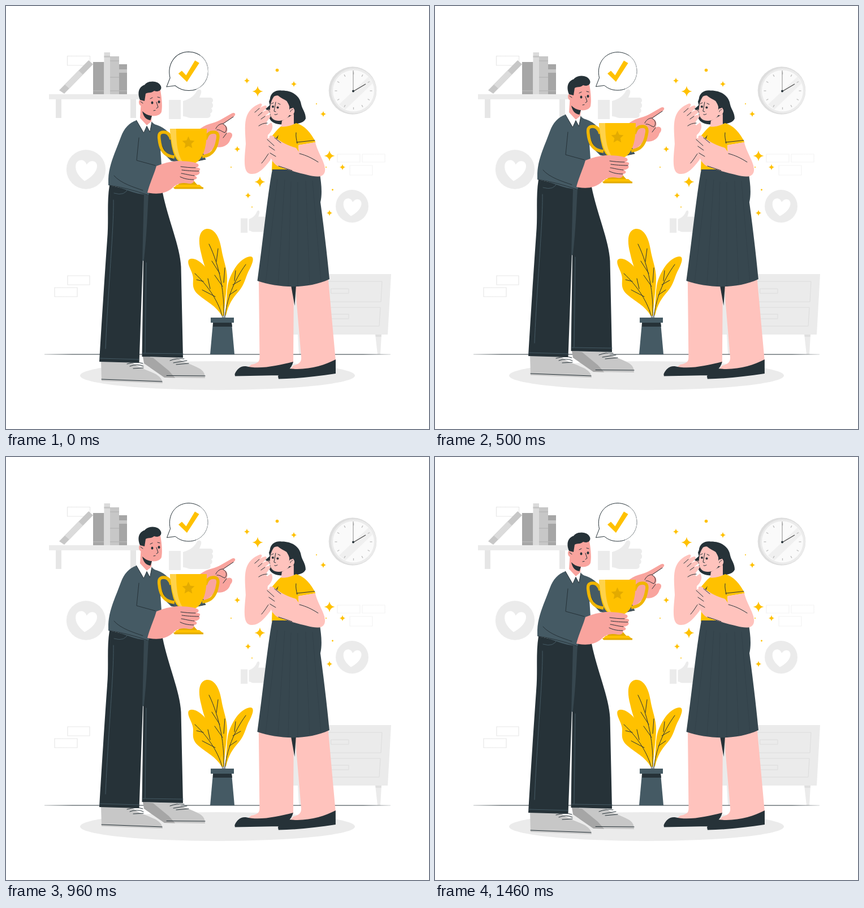
Animation of 748 by 748 pixels, one loop 1500 ms. Source, as an HTML page:

```html
<!DOCTYPE html>
<html lang="en">
<head>
<meta charset="utf-8">
<title>Award</title>
<style>
  html, body { margin: 0; width: 100%; height: 100%; overflow: hidden; background: #fff; }
  svg { display: block; width: 100vw; height: 100vh; }
  .pale { fill: #ebebeb; }
  .white { fill: #fff; }
  .mid { fill: #c7c7c7; }
  .grey { fill: #a6a6a6; }
  .light { fill: #dbdbdb; }
  .ink { fill: #263238; }
  .slate { fill: #37474f; }
  .wool { fill: #455a64; }
  .gold { fill: #ffc100; }
  .amber { fill: #e3ab00; }
  .skin { fill: #ffc3bd; }
  .tan { fill: #f9a49e; }
  .line, .seam, .edge { fill: none; stroke: #263238; stroke-width: 1; stroke-linecap: round; stroke-linejoin: round; }
  .seam { stroke: #455a64; }
  .edge { stroke: #dcdcdc; }
</style>
</head>
<body>
<svg viewBox="0 0 748 748">
  <defs>
    <linearGradient id="fade"><stop stop-color="#e6e6e6"/><stop offset="1" stop-color="#f4f4f4"/></linearGradient>
    <linearGradient id="floor" gradientUnits="userSpaceOnUse" x1="68" x2="680">
      <stop stop-color="#263238" stop-opacity=".3"/><stop offset=".08" stop-color="#263238"/>
      <stop offset=".92" stop-color="#263238"/><stop offset="1" stop-color="#263238" stop-opacity=".2"/>
    </linearGradient>
    <path id="heart" d="M0 21C-11 15-21 6-21-6C-21-17-7-22-1-10C5-23 20-20 19-7C18 5 9 14 0 21Z"/>
    <path id="thumb" d="M0 18H21V52H0ZM25 20C36 17 44 12 49 3C52-3 59-1 57 6L54 14H74C79 15 79 21 76 23C79 26 79 31 75 33C78 36 77 41 73 42C75 46 73 50 68 50H38C34 50 31 47 25 47Z"/>
  </defs>

  <path d="M108.500 88.500H148.500V105H108.500ZM586 262H626V276H586ZM630 262H670V276H630ZM608 282H648V299H608ZM109 477H148V493H109ZM86 498H126V514H86Z" fill="none" stroke="url(#fade)" stroke-width="1.200"/>

  <!-- shelf and books -->
  <path fill="#e6e6e6" d="M88 164H98V198H88ZM220 164H230V198H220Z"/>
  <path class="pale" d="M76 156H242V165H76Z"/>
  <path class="mid" d="M94 149L146 96L154 103L103 155Z"/>
  <path class="light" d="M104 139L128 114L136 121L112 146Z"/>
  <path class="grey" d="M154 99H173.500V156H154ZM200 103H214V156H200Z"/>
  <path class="light" d="M173.500 82H184V156H173.500Z"/>
  <path class="mid" d="M184 89H200V156H184ZM173.500 88H184V91H173.500ZM200 112H214V118H200Z"/>
  <path d="M154 150H173M184 97H200M184 150H214M184 126H200" stroke="#b8b8b8" stroke-width="1.500"/>

  <!-- clock -->
  <circle cx="613" cy="149.500" r="42.300" fill="#dedede"/>
  <circle cx="615" cy="150" r="40" class="pale"/>
  <circle cx="614.500" cy="150" r="36.500" fill="#fafafa"/>
  <path fill="#f0f0f0" d="M589 174L641 125L648 137L600 183Z"/>
  <g id="ticks" stroke="#bdbdbd" stroke-width="1.300"></g>
  <path d="M614 114V150" stroke="#8a8a8a"/>
  <path d="M614 151L636 138" stroke="#4a4a4a" stroke-width="1.200"/>
  <circle cx="614" cy="150.500" r="2" class="ink"/>

  <use href="#thumb" x="288" y="148" class="pale"/>
  <use href="#thumb" class="pale" transform="translate(415 362) scale(.58 .75)"/>
  <circle cx="141.500" cy="289" r="34.700" class="pale"/>
  <use href="#heart" class="white" transform="translate(142 290) rotate(9) scale(.94)"/>
  <circle cx="612" cy="354" r="29" class="pale"/>
  <use href="#heart" class="white" transform="translate(612.500 355) rotate(9) scale(.79)"/>

  <!-- cabinet -->
  <path class="pale" d="M500 474H681L675 581H498ZM516 581H524L522 616H518ZM653 581H664L662 616H657Z"/>
  <path fill="#dfdfdf" d="M653 581H664L663.500 585H654Z"/>
  <path class="edge" d="M520 487H665L663 523H520ZM520 533H662L660 566H520ZM575 500H606V508H575ZM575 545H606V553H575Z"/>

  <path d="M68 616L680 616.100" stroke="url(#floor)"/>
  <ellipse cx="374" cy="653.500" rx="243" ry="25.500" class="pale"/>

  <!-- plant -->
  <g class="gold">
    <path d="M383 548C382 527 379 512 371 499C358 480 350 460 345 437C339 414 341 396 355 394C370 393 378 411 381 430C384 449 391 464 391 481C391 500 387 520 385 548Z"/>
    <path d="M381 547C371 530 355 523 342 512C328 501 331 492 331 482C331 470 319 457 323 449C330 442 348 453 356 467C361 479 372 489 377 502C382 518 381 535 383 548Z"/>
    <path d="M387 547C391 525 389 508 393 490C399 469 413 446 431 443C440 442 437 453 431 465C424 477 423 489 415 500C407 511 395 520 389 547Z"/>
  </g>
  <path class="line" d="M385 551C387 510 378 460 359 421M372 452L375 429M378 473L364 451M383 496L369 476M385 489L387 463M383 551C377 525 359 496 334 473M361 500L357 482M349 487L337 484M370 514L347 502M387 551C390 520 402 487 424 457M404 486L406 468M401 493L415 485M395 511L408 502"/>
  <path class="wool" d="M366 560H399L404 616H361Z"/>
  <path class="ink" d="M366 560H399L400 567H366Z"/>
  <path class="wool" d="M362 551H403V560H362Z"/>

  <g id="sparkles" class="gold"></g>

  <g id="bubble">
    <path d="M284.500 142.500L290.500 127C285 103 299 82 323 81.500C343 82 357 96 357 115.500C357 134 343 149 323 149C313 149 306 146 299.500 140.500Z" fill="#fff" stroke="#263238"/>
    <path d="M336 147C350 141 358 130 357 112C356 101 350 93 343 88" fill="none" stroke="#fff" opacity=".75"/>
    <path class="gold" d="M305 119.500L311 114.500L318.500 122.500L334 96.500L341.500 101L320 134Z"/>
  </g>

  <g id="woman">
    <path class="skin" d="M447 486L509 490L508 631L480 645L424 642L434 634C446 632 448.500 628 448.500 621ZM511 490L570 484L583 628L545 643L500 645L508 636C519 633 523 629 522 620Z"/>
    <path class="ink" d="M504 494H513L510.500 530Z"/>
    <path class="ink" d="M404.500 651C408 642 415 636 424 637C449 643 480 636 508 629C505 642 494 649 483 653L405 654.500ZM481 655C485 645 491 641 500 641C531 645 562 636 583 625V650C548 655 516 659 482 659.500Z"/>

    <!-- head -->
    <path class="ink" d="M468 174C463 157 474 148 487 149.500C506 149 520 159 522 174C524 183 530 188 530 199C527 208 510 210 498 208C485 212 470 208 466 199L467 189L459 182Z"/>
    <path class="skin" d="M488 203L509 191V207C510 215 501 220 486 217Z"/>
    <path class="skin" d="M469 163C476 157 484 157 491 162C497 167 500 174 502 180C507 176 512 183 509 190C506 195 503 193 501 193C497 201 486 205 476 202C468 199 466 191 467 181Z"/>
    <path class="ink" d="M470 157L478 155C484 163 494 165 499 170C502 175 501 181 501 186L507 180L510 163L486 151ZM479 154C474 159 469 166 467 177L465 169L470 157Z"/>
    <circle cx="505.500" cy="185.500" r="4.800" class="skin"/>
    <path class="line" d="M477 170L474 186L477 187M469 173L473 171M481 172L485 174M475 192Q478 193 480 191M503 187Q504 183 507 183"/>
    <circle cx="472" cy="178" r="2" class="ink"/>
    <circle cx="480.500" cy="179.500" r="2" class="ink"/>

    <path class="gold" d="M486 213C494 215 506 211 513 207C528 211 540 225 547.500 241L517 246L520 291H470L472 245L468 233C474 225 480 218 486 213Z"/>
    <path class="line" d="M513 224C512 231 514 237 515 243M514 241L546 237.500" stroke-width=".8"/>

    <!-- raised arm -->
    <path class="skin" d="M469 206C474 213 470 222 463 228L462 242L472 254L468 272C459 283 449 297 435 297C419 297 421 276 424 244C423 224 421 207 426 194C430 184 438 177 448 173C454 171 454 176 448 181C454 177 460 174 461 178C462 181 456 184 453 188C461 182 468 182 467 186C466 190 461 191 458 195C465 191 470 192 467 197C463 202 458 207 462 211Z"/>
    <path class="line" d="M448 181L440 188M453 188L446 194M458 195L451 200M462 207C456 207 451 209 447 212M468 258C463 260 461 268 452 278M460 181L466 186"/>

    <path class="slate" d="M471 289C462 336 454 420 444.500 486C482 499 534 501 572 483C568 440 561 383 556 347C560 330 557 311 555 297L523 289Z"/>
    <path d="M480 306L459 490M493 307L481 493M504 310L499 495M516 311V495M530 309L537 492M542 309L557 487" fill="none" stroke="#314048" stroke-width=".7"/>

    <!-- hand on chest -->
    <path class="ink" d="M472.500 241L482 228L477 242Z"/>
    <path class="skin" d="M517 246L547 241C552 262 566 278 564 292C562 305 546 302 534 299C512 294 493 288 480 283C470 276 469 269 465 262C461 255 463 250 460 243C458 236 461 232 466 234C464 229 470 227 475 232L487 240C495 245 504 248 513 251L518 258Z"/>
    <path class="line" d="M462 236L474 247M465 248L475 255M467 260L477 266M475 233L486 242M519 261C531 264 541 269 552 276M482 283L506 291"/>
  </g>

  <g id="man">
    <!-- shoes -->
    <path class="mid" d="M242 620L303 622C312 630 328 633 342 641C349 645 352 650 352 658L291 657Z"/>
    <path class="grey" d="M242 620L260 622L288 645L299 657.500L280 657L244 632Z"/>
    <path class="mid" d="M168 627H220C229 638 248 643 263 650C272 655 276 659 277 667L169 663Z"/>
    <path class="line" d="M169 660L276 664M284 653.500L352 654M214 633Q231 628 242 632M219 637Q232 632 243 637M225 641L243 640M290 627Q303 622 315 624M296 631L320 627M301 634L323 632"/>

    <!-- trousers -->
    <path class="ink" d="M242 330H277C286 376 308 425 309.500 461L313 622L240.500 620L243 448Z"/>
    <path class="ink" d="M183 317L251 332L242 450L235.500 631L165 629C169 560 175 470 179 413C182 377 178 348 183 317Z"/>
    <path class="slate" d="M244 333H252C250 368 249 404 244 448L241 453Z"/>
    <path class="seam" stroke-width=".8" d="M190 343C191 390 180 508 176 606M166 623L235 625M242 614L313 615M191 331Q211 337 216 322M248 454L246 613"/>

    <!-- far arm and pointing hand -->
    <path class="tan" d="M340 220C352 208 367 208 378 202L399 190C405 187 408 192 402 196L384 209C392 211 393 219 390 225C400 220 403 229 397 235C394 246 383 252 370 249L350 268L325 250Z"/>
    <path class="line" d="M402 196L384 208C378 208 373 212 371 217M384 209C391 212 391 220 387 224C381 222 378 218 373 219M390 225L384 233"/>
    <path class="wool" d="M262 209C278 213 289 222 296 238L349 261L353 271L315 278L292 274L270 252Z"/>
    <path class="line" d="M271 234C275 249 284 265 296 273M339 274L353 271"/>

    <!-- torso -->
    <path class="wool" d="M231 202C217 207 209 216 203 232C194 257 182 280 181 306V317C204 319 227 334 252 334L270 292L275 282L272 238L264 210L256 204Z"/>
    <path class="line" d="M235 233L231 273L264 282M191 300C203 314 228 321 242 326M183 317Q216 322 250 334"/>
    <path class="white" d="M230.500 202L237 196L258 204L254.500 223L249 212.500L243.500 224.500Z"/>
    <path class="line" d="M230.500 202L243.500 224.500L249 212.500L254.500 223L258 205" stroke-width=".7"/>
    <path class="tan" d="M239 168L258 190L257 204L249 211L237 198Z"/>
    <path class="ink" d="M241 186C246 191 252 194 258 194L255.500 202C248 201 243 196 241 186Z"/>

    <!-- head -->
    <path class="tan" d="M244 150L273 149C275 160 277 176 275 187C273 194 260 197 252 192C246 188 244 181 244 176C239 179 235 175 235 170C235 165 240 163 244 166Z"/>
    <path class="ink" d="M237 166C232 155 234 143 245 139.500C251 131 270 131 274 142C276 148 271 153 262 150C256 155 251 152 247 155L245 168Z"/>
    <path class="line" d="M255 164L259 162M268 161L272 162M266 170L269 179L266 181M261 185L264 184.500M238 169L242 172"/>
    <ellipse cx="258.500" cy="171" rx="2" ry="2.500" class="ink"/>
    <ellipse cx="270.500" cy="169.500" rx="2" ry="2.500" class="ink"/>

    <!-- trophy -->
    <path d="M292 236C290 227 286 223 279 223C270 223 270 229 271 236C273 256 281 266 298 267M353 236C356 226 360 223 367 223C375 223 376 229 374 237C371 255 363 265 347 266" fill="none" stroke="#f0b500" stroke-width="5.500"/>
    <path class="gold" d="M290 217H355C355 239 353 258 343 271C337 278 331 279 328 281C326 294 327 306 338 316H305C315 306 317 294 316 280C304 278 297 267 294 252C291 240 291 230 290 217Z"/>
    <path fill="#ffd24a" d="M290 217H301C301 245 304 266 315 279C299 274 293 250 290 217Z"/>
    <path class="amber" d="M314 306H329L338 316H304Z"/>
    <path class="gold" d="M302 316H342L349 322H296Z"/>
    <path class="amber" d="M296 320.500H349V323.500H298Z"/>
    <path id="star" class="amber"/>

    <!-- near hand -->
    <path class="tan" d="M266 283C278 278 290 275 302 274C317 274 332 275 339 279C343 283 339 286 333 286C342 285 346 288 341 292C345 294 341 300 333 300C340 302 338 307 332 307C334 311 330 315 323 314C309 311 301 315 294 322C281 333 265 333 250 330C254 314 261 300 266 283Z"/>
    <path class="line" d="M335 286C325 286 317 285 309 284M341 292C329 292 319 291 311 290M333 300C323 299 317 297 310 296M332 307C321 307 314 305 308 302"/>
  </g>
</svg>
<script>
const LOOP = 1500, STEPS = 36, UNIT = 748 / 500;
const $ = id => document.getElementById(id);

const starPath = (x, y, outer, inner, points) => {
  const corners = Array.from({ length: points * 2 }, (_, i) => {
    const r = i % 2 ? inner : outer, a = i * Math.PI / points - Math.PI / 2;
    return (x + r * Math.cos(a)).toFixed(1) + ' ' + (y + r * Math.sin(a)).toFixed(1);
  });
  return 'M' + corners.join('L') + 'Z';
};
const sparklePath = (x, y, r) => {
  const c = r * .13;
  return `M${x} ${y - r}Q${x + c} ${y - c} ${x + r} ${y}Q${x + c} ${y + c} ${x} ${y + r}` +
    `Q${x - c} ${y + c} ${x - r} ${y}Q${x - c} ${y - c} ${x} ${y - r}Z`;
};

$('star').setAttribute('d', starPath(322.5, 242, 11.5, 5.5, 5));

const sparkles = [[445, 151, 9.5], [426, 132, 5.5], [509, 138, 5.5], [561, 191, 5.5], [572, 265, 9.5],
  [595, 285, 5.5], [449, 311, 9.5], [409, 253, 5.5], [428, 335, 5.5], [572, 366, 5.5]];
const dots = [[479.5, 113.5, 2.8], [549, 173, 1], [398, 285, 1], [566, 285, 1], [577.5, 325, 1.4], [435, 355.5, 1]];
$('sparkles').innerHTML =
  sparkles.map(s => `<path d="${sparklePath(...s)}"/>`).join('') +
  dots.map(([x, y, r]) => `<circle cx="${x}" cy="${y}" r="${r}"/>`).join('');

$('ticks').innerHTML = Array.from({ length: 12 }, (_, i) =>
  `<path d="M614.5 117V121" transform="rotate(${i * 30} 614.5 150)"/>`).join('');

// Keys are [percent, value] pairs joined by straight segments.
const track = (keys, p) => {
  const i = keys.findIndex(([at]) => at >= p);
  const [a, from] = keys[i - 1], [b, to] = keys[i];
  return from + (to - from) * (p - a) / (b - a);
};
const FLOAT = [[0, 0], [50, -10], [100, 0]];
const SHAKE = [[0, 0], [10, -1], [20, 2], [30, -4], [40, 4], [50, -4], [60, 4], [70, -4], [80, 2], [90, -1], [100, 0]];
const BEAT = [[0, 1], [10, 1.1], [30, 1], [40, 1], [50, 1.1], [60, 1], [100, 1]];

function draw(now) {
  const step = Math.floor((now % LOOP + 6) * STEPS / LOOP) % STEPS;
  const p = (step + .5) / STEPS * 100;
  $('man').setAttribute('transform', `translate(0 ${track(FLOAT, p) * UNIT + .4})`);
  $('woman').setAttribute('transform', `translate(${track(SHAKE, p) * UNIT + .2} 0)`);
  $('bubble').setAttribute('transform', `translate(320.5 115) scale(${track(BEAT, p)}) translate(-320.5 -115)`);
}

let start;
function tick(now) {
  start ??= now;
  draw(now - start);
  requestAnimationFrame(tick);
}
draw(0);
requestAnimationFrame(tick);
</script>
</body>
</html>
```
